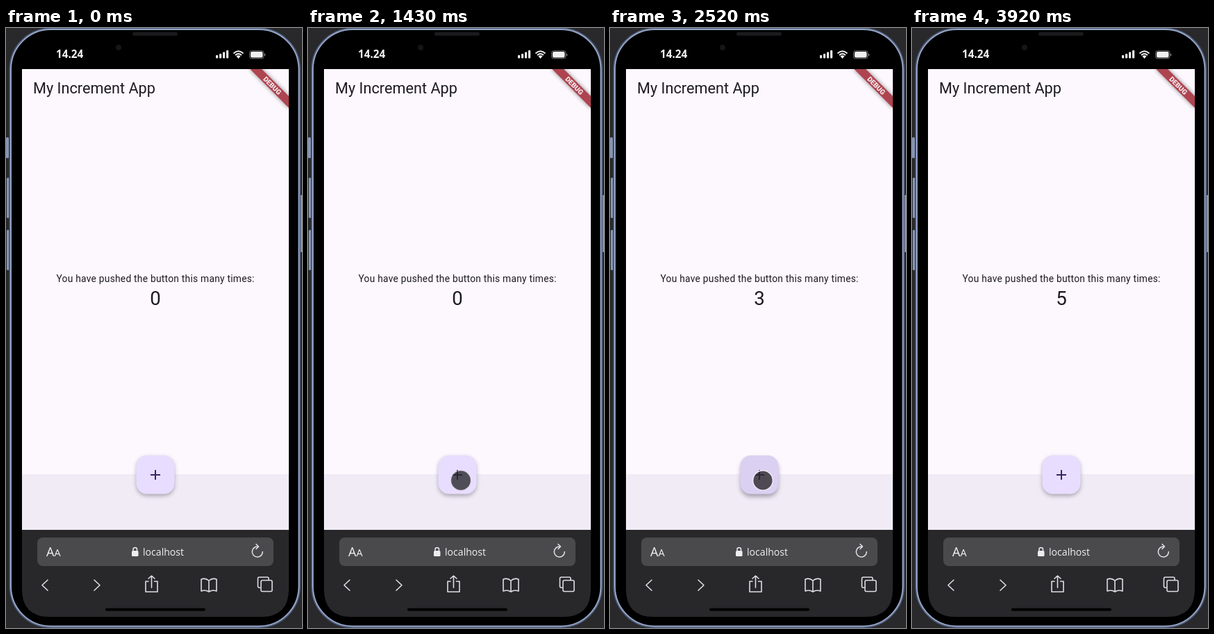
An HTML page for the animation above (4.09 s loop, 426 by 862 pixels).

```html
<!DOCTYPE html>
<html lang="en">
<head>
<meta charset="utf-8">
<title>Counter app demo</title>
<style>
  html, body { margin: 0; width: 100%; height: 100%; overflow: hidden; background: #29292b; }
  svg { display: block; width: 100%; height: 100%; }
  text { font-family: Roboto, sans-serif; fill: #1d1b20; }
  .system { font-family: "Open Sans", "Noto Sans", sans-serif; fill: #f2f2f5; }
  .icons { fill: none; stroke: #dedee3; stroke-width: 1.6; stroke-linecap: round; stroke-linejoin: round; }
</style>
</head>
<body>
<svg viewBox="0 0 426 862">
  <defs>
    <clipPath id="screen"><path d="M23 59H407V806Q407 846 367 846H63Q23 846 23 806Z"/></clipPath>
    <filter id="soft" x="-50%" y="-50%" width="200%" height="200%"><feGaussianBlur stdDeviation="3"/></filter>
  </defs>

  <!-- Phone body -->
  <rect width="426" height="862" fill="#29292b"/>
  <g fill="#8795b2">
    <rect x="0" y="157" width="4" height="30" rx="1.5"/>
    <rect x="1" y="215" width="3.5" height="58" rx="1.5"/>
    <rect x="1" y="290" width="3.5" height="58" rx="1.5"/>
    <rect x="424" y="240" width="2" height="82"/>
  </g>
  <rect x="5.5" y=".5" width="417.5" height="860.5" rx="59" fill="#000" stroke="#4d5a78" stroke-width="2"/>
  <rect x="7" y="2" width="414.5" height="857.5" rx="57.5" fill="#000" stroke="#96a6c8" stroke-width="2"/>
  <rect x="182" y="6" width="65" height="5" rx="2.5" fill="#1a1a1d"/>
  <circle cx="162" cy="28" r="4" fill="#15151a"/>

  <!-- Status bar -->
  <text class="system" x="72" y="43" font-size="15.3" font-weight="700">14.24</text>
  <g fill="#f0f0f2">
    <rect x="302" y="39" width="3.2" height="4.5" rx="1"/>
    <rect x="307" y="37" width="3.2" height="6.5" rx="1"/>
    <rect x="312" y="34.5" width="3.2" height="9" rx="1"/>
    <rect x="317" y="32" width="3.2" height="11.5" rx="1"/>
    <path d="M334.5 44L331.5 40.500Q334.500 38 337.500 40.500Z"/>
    <rect x="352" y="34" width="17.500" height="8.500" rx="2"/>
  </g>
  <path d="M327.500 36.500Q334.500 30 341.500 36.500M330 39Q334.500 34.800 339 39" fill="none" stroke="#f0f0f2" stroke-width="1.9"/>
  <rect x="350.500" y="32.800" width="20.500" height="11" rx="3" fill="none" stroke="#77777a"/>
  <path d="M372.500 37V40" stroke="#77777a" stroke-width="1.500"/>

  <g clip-path="url(#screen)">
    <!-- App page -->
    <rect x="23" y="59" width="384" height="582" fill="#fdf8fe"/>
    <rect x="23" y="641" width="384" height="80" fill="#f0ebf5"/>
    <text x="39" y="94" font-size="21.700">My Increment App</text>
    <text x="72.500" y="365" font-size="13.800" letter-spacing=".246">You have pushed the button this many times:</text>
    <text id="count" x="215" y="398" font-size="27.600" text-anchor="middle">0</text>
    <g transform="translate(407 59) rotate(45) scale(.985)">
      <rect x="-40" y="28" width="80" height="12" opacity=".45" filter="url(#soft)"/>
      <rect x="-40" y="28" width="80" height="12" fill="#ae4450"/>
      <text y="37.700" font-size="10.200" font-weight="900" text-anchor="middle" style="fill:#f5e8ec">DEBUG</text>
    </g>

    <!-- Floating button -->
    <rect id="shadow" x="188" y="617" width="54" height="55" rx="15" fill="#3c3848" opacity=".42" filter="url(#soft)"/>
    <rect id="button" x="187.500" y="614" width="55" height="55.500" rx="15.500"/>
    <path d="M208 642H222M215 635V649" stroke="#372763" stroke-width="2"/>

    <!-- Browser toolbar -->
    <rect x="23" y="721" width="384" height="125" fill="#28282b"/>
    <rect x="45" y="732" width="340" height="41" rx="8" fill="#4a4a4d"/>
    <text class="system" x="58" y="759" font-size="18">A<tspan font-size="14.500">A</tspan></text>
    <text class="system" x="197" y="757.500" font-size="14.100">localhost</text>
    <rect x="181" y="751" width="9.500" height="8" rx="1.500" fill="#ededf0"/>
    <path d="M183 751V749Q183 746.500 185.750 746.500T188.500 749V751" fill="none" stroke="#ededf0" stroke-width="1.500"/>
    <g class="icons">
      <path d="M362 745A7.500 7.500 0 1 0 369.300 752.500M360 741.500L363.500 745L360 748.500"/>
      <path d="M60 793L52 800.500L60 808M127 793L135 800.500L127 808"/>
      <path d="M205 795H201V810H218V795H213.500M209.500 804V787M205 791L209.500 787L214 791"/>
      <path d="M292 794Q287 789.500 281 792V809Q287 806.500 292 810Q297 806.500 303 809V792Q297 789.500 292 794V810"/>
      <path d="M366 804H364.500Q362.500 804 362.500 802V791Q362.500 789 364.500 789H376Q378 789 378 791V793"/>
      <rect x="367" y="793.500" width="16" height="16" rx="2"/>
    </g>
    <rect x="143" y="833.500" width="144" height="4" rx="2"/>
  </g>

  <circle id="pointer" r="14.300" fill="#26262a" fill-opacity=".79" stroke="#f1edf6" stroke-width="1.400"/>
</svg>
<script>
  const LOOP = 4090;
  const TAPS = Array.from({ length: 5 }, (_, i) => 1560 + 465 * i);
  const IDLE = [232, 221, 254], PRESSED = [206, 193, 233], FADED = [219, 208, 242];
  const REST = [220, 650], ENTRY = [441, 805], EXIT = [441, 880];

  const [count, shadow, button, pointer] =
    ["count", "shadow", "button", "pointer"].map(id => document.getElementById(id));

  const ramp = (t, from, to) => Math.max(0, Math.min(1, (t - from) / (to - from)));
  const blend = (a, b, k) => a.map((v, i) => v + (b[i] - v) * k);
  const rgb = c => `rgb(${c.map(Math.round)})`;

  // The pointer glides in with an ease-out and leaves with an ease-in.
  function pointerAt(t) {
    return t < 1200
      ? blend(REST, ENTRY, (1 - ramp(t, 70, 1190)) ** 2.17)
      : blend(REST, EXIT, ramp(t, 3570, 3920) ** 2);
  }

  function draw(t) {
    count.textContent = TAPS.filter(tap => tap <= t).length;

    const active = ramp(t, 1430, 1530) * (1 - ramp(t, 3610, 3860));
    const fade = Math.max(...TAPS.map(tap => ramp(t, tap - 90, tap - 20) * (1 - ramp(t, tap + 30, tap + 90))));
    button.setAttribute("fill", rgb(blend(IDLE, blend(PRESSED, FADED, fade), active)));
    shadow.setAttribute("y", 617 + 1.5 * active);

    const [x, y] = pointerAt(t);
    const held = ramp(t, 1430, 1480) * (1 - ramp(t, 3590, 3650));
    pointer.setAttribute("cx", x);
    pointer.setAttribute("cy", y);
    pointer.setAttribute("stroke-opacity", 0.4 + 0.6 * held);
  }

  const start = performance.now();
  function tick() {
    draw((performance.now() - start) % LOOP);
    requestAnimationFrame(tick);
  }
  tick();
</script>
</body>
</html>
```
